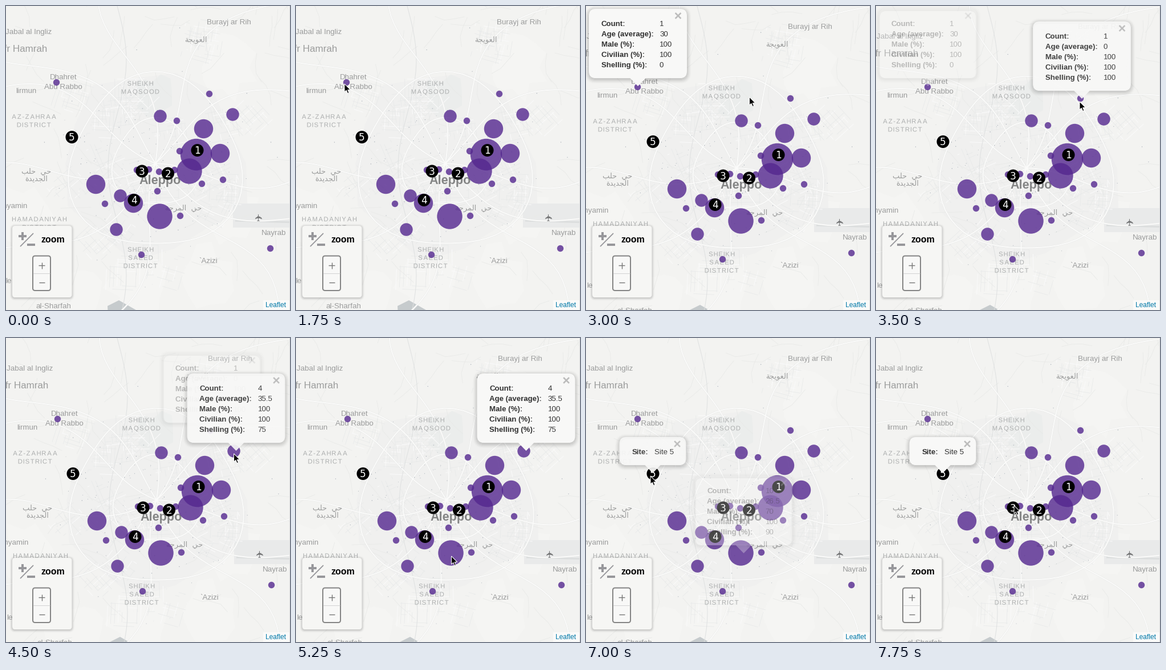
Animation of 498x531 px, one loop 8000 ms. Source, as a matplotlib script:

```python
import numpy as np
import matplotlib.pyplot as plt
from matplotlib.animation import FuncAnimation
from matplotlib.collections import LineCollection
from matplotlib.patches import Circle, FancyBboxPatch, PathPatch, Polygon
from matplotlib.path import Path
from matplotlib.textpath import TextPath
from matplotlib.transforms import Affine2D

W, H, FRAMES, STEP = 498, 531, 32, 250
SANS, DEJAVU = "Liberation Sans", "DejaVu Sans"
CENTRE = np.array([262, 275])
SHIFT = np.array([2, 8])  # how far the map slides when the first popup opens

rng = np.random.default_rng(12)
fig = plt.figure(figsize=(W / 72, H / 72), dpi=72, facecolor="#f3f3f1")
ax = fig.add_axes([0, 0, 1, 1])
ax.set_xlim(0, W)
ax.set_ylim(H, 0)
ax.axis("off")

pan = Affine2D()
on_map = pan + ax.transData
on_screen = ax.transData


def rounded(x, y, w, h, r, z, tr=on_screen, **kw):
    box = FancyBboxPatch((x, y), w, h, boxstyle=f"round,pad=0,rounding_size={r}",
                         zorder=z, **kw)
    box.set_transform(tr)
    return ax.add_artist(box)


def shadow(x, y, w, h, r, z, tr, drop, reach, strength):
    """Rings outside the box, so that a fading box does not darken."""
    return [rounded(x - d, y - d + drop, w + 2 * d, h + 2 * d, r + d, z, tr, fc="none",
                    ec="black", lw=1, alpha=strength * (1 - max(d, 0) / reach) ** 1.5)
            for d in np.arange(0.5 - drop, reach)]


def write(x, y, s, size, color, z=2, tr=on_map, family=SANS, **kw):
    return ax.text(x, y, s, fontsize=size, color=color, zorder=z, transform=tr,
                   family=family, clip_on=True, **kw)


def lines(segs, color, width, z=0.5):
    ax.add_collection(LineCollection(segs, colors=color, linewidths=width, zorder=z,
                                     transform=on_map), autolim=False)


def blob(centre, size, rough, color, z):
    """Closed outline whose radius wobbles at random."""
    a = np.linspace(0, 2 * np.pi, 14, endpoint=False)
    rad = size * rng.uniform(1 - rough, 1 + rough, 14)
    pts = centre + np.c_[rad * np.cos(a), rad * np.sin(a)]
    ax.add_artist(Polygon(pts, fc=color, ec="none", zorder=z, transform=on_map))


# ---- base map ----
for _ in range(9):
    blob(rng.uniform(0, (W, H)), 50, 0.3, "#f5f5f3", 0.1)
blob(CENTRE, 160, 0.12, "#f0f0ef", 0.2)
blob((262, 160), 38, 0.3, "#ebedec", 0.3)
ax.add_artist(plt.Rectangle((398, 345), 120, 42, fc="#e9eaea", zorder=0.3,
                            transform=on_map))
lines([[(402, 375), (510, 378)]], "#dcdede", 3)
ax.add_artist(Polygon([(178, 524), (198, 514), (228, 531), (180, 560)], fc="#c6cbcd",
                      zorder=0.3, transform=on_map))

streets = []
for _ in range(24):  # city quarters, each a small turned grid
    turn = rng.uniform(0, np.pi / 2)
    rot = np.array([[np.cos(turn), np.sin(turn)], [-np.sin(turn), np.cos(turn)]])
    place = rng.normal(CENTRE, (95, 90))
    for u in np.arange(-30, 30, 6.5):
        a, b = np.sort(rng.uniform(-32, 32, 2))
        streets += [np.array([(u, a), (u, b)]) @ rot + place,
                    np.array([(a, u), (b, u)]) @ rot + place]
lines(streets[::3], "#fafafa", 1.1)
lines(streets[1::3] + streets[2::3], "#e7e9e9", 0.7)

lanes = []
for _ in range(80):
    turn = rng.uniform(0, 2 * np.pi) + np.cumsum(rng.normal(0, 0.25, 4))
    hops = 18 * np.c_[np.cos(turn), np.sin(turn)]
    lanes.append(rng.uniform(0, (W, H)) + np.cumsum(hops, axis=0))
lines(lanes, "#e9eae8", 0.8, 0.4)

roads = []
far = np.linspace(0, 420, 30)
for k in range(11):  # avenues out of the centre
    a = 2 * np.pi * k / 11 + rng.normal(0, 0.1) + 0.25 * np.sin(far / 90 + k)
    roads.append(CENTRE + np.c_[far * np.cos(a), far * np.sin(a)])
a = np.linspace(0, 2 * np.pi, 60)
for size in (75, 150):  # ring roads
    rad = size * (1 + 0.07 * np.sin(3 * a))
    roads.append(CENTRE + np.c_[rad * np.cos(a), rad * np.sin(a)])
lines(roads, "#e8e9e8", 2.8, 0.6)
lines(roads, "#fbfbfa", 1.9, 0.65)

y = np.linspace(-20, 560, 40)
lines([np.c_[195 + 16 * np.sin(y / 60), y]], "#dfe1e1", 1)  # river

spots = rng.normal(CENTRE, (88, 80), (150, 2))
ax.scatter(*spots.T, s=rng.uniform(0.5, 2, 150), c="#7f8a98", lw=0, alpha=0.7,
           zorder=0.8, transform=on_map)


# ---- map labels ----
def spaced(x, y, s, size=11.3, gap=2.4):
    """Capitals centred on x with even gaps between them."""
    parts, end = [], 0
    for ch in s:
        glyph = TextPath((0, 0), ch, size=size, prop={"family": SANS})
        ext = glyph.get_extents()
        parts.append(Affine2D().translate(end - ext.x0, 0).transform_path(glyph))
        end += ext.width + gap
    place = Affine2D().scale(1, -1).translate(x - (end - gap) / 2, y + size * 0.36)
    path = place.transform_path(Path.make_compound_path(*parts))
    ax.add_artist(PathPatch(path, fc="#aeb0b0", ec="none", zorder=2, transform=on_map))


for x, y, name in [(235.5, 135, "SHEIKH MAQSOOD"), (49, 193, "AZ-ZAHRAA DISTRICT"),
                   (58.5, 372, "HAMADANIYAH DISTRICT"),
                   (236, 425, "SHEIKH SAEED DISTRICT")]:
    for row, word in enumerate(name.split()):
        spaced(x, y + 14.3 * row, word)

GREY = "#9c9d9d"
for x, y, name in [(101, 128, "Dhahret"), (100, 145, "Abu Rabbo"), (35.5, 152, "lirmun"),
                   (391, 32, "Burayj ar Rih"), (470, 400, "Nayrab"),
                   (355, 449, "`Azizi"), (83, 528, "al-Sharfah")]:
    write(x, y, name, 13.4, GREY, ha="center")
# names cut by the left edge
for x, y, name, size in [(80, 49, "Jabal al Ingliz", 13.4), (72, 80, "Kafr Hamrah", 17),
                         (38, 353, "Bunyamin", 13.4), (10, 484, "le", 13.4)]:
    write(x, y, name, size, GREY, ha="right")
# Arabic in presentation forms, left to right as seen
for x, y, name in [(333, 63, "\ufe94\ufea0\ufef3\ufeee\ufecc\ufedf\ufe8d"),
                   (53, 293, "\ufe90\ufee0\ufea3  \ufef2\ufea3"),
                   (53, 306, "\ufe93\ufeaa\ufef3\ufeaa\ufea0\ufedf\ufe8d"),
                   (311, 357, "\ufe94\ufe9f\ufeae\ufee4\ufedf\ufe8d  \ufef2\ufea3")]:
    write(x, y, name, 13, GREY, family=DEJAVU, ha="center")
write(270, 311, "Aleppo", 21.6, "#858686", weight="bold", ha="center")
write(444.5, 367.5, "\u2708", 17, "#6f7071", family=DEJAVU, ha="center", va="center",
      rotation=90)

# ---- data circles by size class, and numbered sites ----
classes = [
    [(88, 133), (356, 153), (299, 200), (304, 253), (380, 303), (343, 310), (295, 286),
     (268, 289), (250, 285), (229, 286), (265, 323), (173, 345), (305, 366),
     (463, 423), (237, 434)],
    [(270, 192), (397, 189), (200, 331), (193, 390)],
    [(346, 214), (375, 257), (157, 311), (223, 344)],
    [(321, 288), (269, 367)],
    [(333, 259)],
]
for k, group in reversed(list(enumerate(classes, 1))):
    for x, y in group:
        ax.add_artist(Circle((x + 0.5, y + 0.5), 5.5 * k + 0.2, fc="#54278f", ec="none",
                             alpha=0.8, zorder=3, transform=on_map))

sites = [(335.5, 252), (284, 292.5), (238.5, 288.5), (224.5, 339), (115.5, 229)]
for n, (x, y) in enumerate(sites, 1):
    ax.add_artist(Circle((x, y), 11, fc="black", ec="none", zorder=4, transform=on_map))
    write(x, y + 6.2, str(n), 17, "white", 5, family=DEJAVU, ha="center")


# ---- popups ----
class Popup:
    def __init__(self, opens, tip, rows, w=172, value_x=124):
        self.opens, self.tip = opens, np.array(tip)
        h = 31 + 18 * len(rows)
        x, y = tip[0] - w / 2, tip[1] - 13 - h
        z, end = 6 + opens / FRAMES, y + h  # later popups lie on top
        paper = dict(fc="#f8f8f7", ec="none")
        self.parts = shadow(x, y, w, h, 12, z, on_map, 2, 8, 0.17)
        self.parts.append(rounded(x, y, w, h, 12, z, on_map, **paper))
        point = [(tip[0] - 14, end - 0.3), (tip[0] + 14, end - 0.3), (tip[0], end + 14)]
        self.parts.append(ax.add_artist(Polygon(point, zorder=z, transform=on_map, **paper)))
        cx, cy = x + w - 15.5, y + 12
        for s in (-4, 4):
            self.parts += ax.plot([cx - 4, cx + 4], [cy - s, cy + s], lw=2.6,
                                  color="#bcbcbc", zorder=z + 0.01, transform=on_map)
        for i, (name, value) in enumerate(rows):
            base = y + 30 + 18 * i
            for dx, s, weight in [(22, name, "bold"), (value_x, value, "normal")]:
                self.parts.append(write(x + dx, base, s, 13.3, "#333333", z + 0.01,
                                        weight=weight))
        self.base = [p.get_alpha() or 1 for p in self.parts]

    def fade(self, a):
        for part, full in zip(self.parts, self.base):
            part.set_alpha(full * a)
            part.set_visible(a > 0)


FIELDS = ["Count:", "Age (average):", "Male (%):", "Civilian (%):", "Shelling (%):"]


def stats(opens, tip, values):
    return Popup(opens, tip, list(zip(FIELDS, values.split())))


popups = [
    stats(8, (89, 131), "1 30 100 100 0"),
    stats(14, (359, 153), "1 0 100 100 100"),
    stats(18, (401.5, 188), "4 35.5 100 100 75"),
    stats(22, (274.5, 367), "10 26.5 70 100 90"),
    Popup(28, (115, 227), [("Site:", "Site 5")], w=117, value_x=61.5),
]

# ---- zoom panel and credit ----
shadow(11, 384, 104.5, 125, 5, 7, on_screen, 1, 5, 0.17)
rounded(11, 384, 104.5, 125, 5, 7.1, fc="#f6f6f4", ec="none")


def bar(x, y, dx, dy, width, color="#97979b"):
    ax.plot([x - dx, x + dx], [y - dy, y + dy], lw=width, color=color, zorder=7.3,
            solid_capstyle="butt")


def plus(x, y, r, width, color="#97979b"):
    bar(x, y, r, 0, width, color)
    bar(x, y, 0, r, width, color)


plus(29, 402, 7, 4)
bar(36.5, 408.5, 11.5, -11.5, 1.8)
bar(44, 416.5, 7, 0, 4)
write(61, 413, "zoom", 16, "black", 7.3, on_screen, weight="bold")
rounded(47, 436.5, 31, 60.5, 4, 7.2, fc="#f8f8f7", ec="#858585", lw=2)
bar(62.5, 467, 14.5, 0, 1, "#d2d2d2")
plus(63, 453, 5.5, 1.4, "#777777")
bar(63, 482.5, 5, 0, 1.4, "#777777")

ax.add_artist(plt.Rectangle((451, 514), 47, 17, fc="white", alpha=0.6, zorder=7))
write(455, 525.5, "Leaflet", 12, "#0078a8", 7.3, on_screen)
ax.plot([497.5, 497.5], [0, H], lw=1, color="#dfdfdf", zorder=7.4)

# ---- pointer: it travels from stop to stop, three frames each time ----
arrow = np.array([(0, 0), (0, 14.2), (3.3, 11.3), (5.6, 16.6), (8, 15.6), (5.7, 10.5),
                  (10.2, 10.2)])
pointer = ax.add_artist(Polygon(arrow, fc="black", ec="white", lw=1, zorder=9))
TRAVEL = 3
start = np.array([223, 64])
first, *later = popups
stops = [(4, first.tip + (-4, 5))]
stops += [(p.opens - 1, p.tip + SHIFT + (-4, 6)) for p in later]
stops.append((FRAMES - 1, sites[2] + SHIFT + (1.5, -4)))


def pointer_at(frame):
    spot = start
    for arrive, stop in stops:
        t = np.clip((frame - arrive) / TRAVEL + 1, 0, 1)
        spot = spot + (stop - spot) * t * t * (3 - 2 * t)
    return spot


def shown(opens, frame, early):
    """0 before the opening frame, `early` on it, 1 after it."""
    return 0 if frame < opens else early if frame == opens else 1


def draw(frame):
    pan.clear().translate(*(SHIFT * shown(first.opens, frame, 0.6)))
    for popup, following in zip(popups, popups[1:] + [None]):
        closed = shown(following.opens, frame, 0.7) if following else 0
        popup.fade(shown(popup.opens, frame, 0.92) * (1 - closed))
    pointer.set_xy(arrow + pointer_at(frame))
    pointer.set_visible(frame > 0)
    return []


anim = FuncAnimation(fig, draw, frames=FRAMES, interval=STEP, repeat=True,
                     repeat_delay=0, init_func=lambda: draw(0))
plt.show()
```
